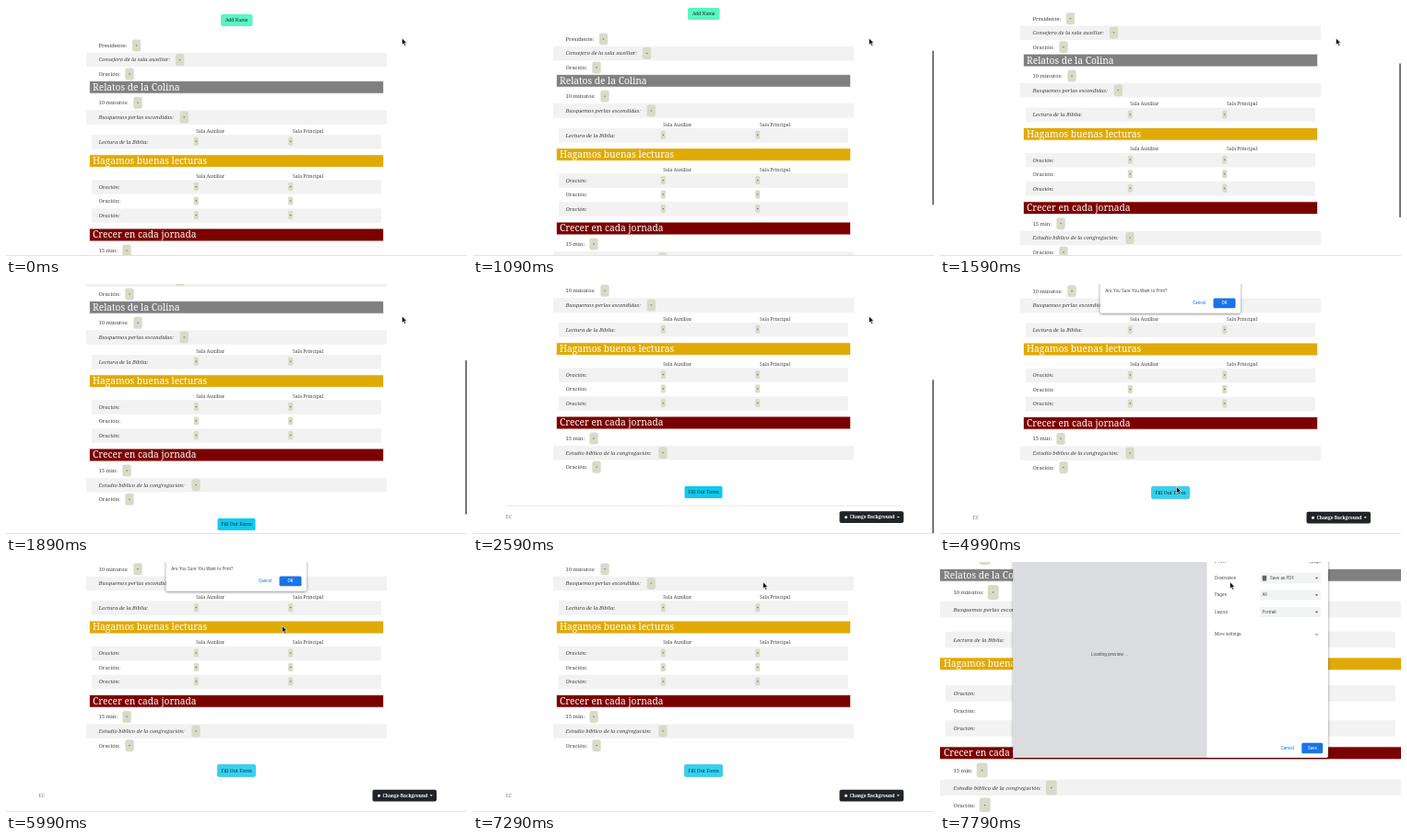
Recreate the animation shown at these times as an HTML page. Size 500 by 272 pixels, loop 7990 ms.

```html
<!DOCTYPE html>
<html lang="es">
<head>
<meta charset="utf-8">
<title>Programa</title>
<style>
html, body { margin: 0; width: 100%; height: 100%; overflow: hidden; background: #fff; }
svg { display: block; width: 100vw; height: 100vh; }
text { font-family: "Noto Serif", serif; fill: #404040; white-space: pre; }
.ui { font-family: Inter, sans-serif; }
.italic { font-style: italic; }
.white { fill: #fff; }
.dark { fill: #1c2a2a; }
.blue { fill: #1a73e8; }
.medium { font-weight: 500; }
.bold { font-weight: 600; }
.middle { text-anchor: middle; }
.end { text-anchor: end; }
.shadow { filter: drop-shadow(0 1px 1.5px #0007); }
</style>
</head>
<body>
<svg id="stage" viewBox="0 0 500 272"></svg>
<script>
const LOOP = 7990;
const stage = document.getElementById('stage');

function add(parent, tag, attrs = {}) {
  const node = document.createElementNS('http://www.w3.org/2000/svg', tag);
  for (const name in attrs) node.setAttribute(name, attrs[name]);
  return parent.appendChild(node);
}
const group = (parent, cls = '') => add(parent, 'g', { class: cls });
const rect = (parent, x, y, width, height, fill, rx = 0) =>
  add(parent, 'rect', { x, y, width, height, fill, rx });
const path = (parent, d, attrs) => add(parent, 'path', { d, ...attrs });

// y is the optical middle of the line
function text(parent, label, x, y, size, cls = '') {
  const node = add(parent, 'text', { x, y: y + size * 0.34, 'font-size': size, class: cls });
  node.textContent = label;
  return node;
}

function picker(parent, x, y, w, h) {
  rect(parent, x - w / 2, y - h / 2, w, h, '#d9dbc9', w / 4);
  path(parent, `M${x - 1} ${y - .6}h2l-1 1.5z`, { fill: '#666' });
}

// a bar with slightly soft edges
function bar(parent, x, y, width, fill) {
  const node = rect(parent, x, y - 6.3, width, 12.6, fill);
  node.setAttribute('stroke', fill);
  node.setAttribute('stroke-opacity', .35);
}

// kind, label, y on screen, y in print layout, picker x or colour
const ROWS = [
  ['plain', 'Presidente:', 43, null, 141.5],
  ['stripe', 'Consejero de la sala auxiliar:', 58.5, null, 188.5],
  ['plain', 'Oración:', 74, -5, 134],
  ['head', 'Relatos de la Colina', 88.4, 14.3, '#808080'],
  ['plain', '10 minutos:', 105.3, 33, 143],
  ['stripe', 'Busquemos perlas escondidas:', 121, 51.8, 193.3],
  ['columns', '', 136, 70],
  ['pair', 'Lectura de la Biblia:', 147.7, 84.5, true],
  ['head', 'Hagamos buenas lecturas', 168.6, 110.8, '#e0aa06'],
  ['columns', '', 185, 128],
  ['pair', 'Oración:', 197, 143, true],
  ['pair', 'Oración:', 212.5, 162, false],
  ['pair', 'Oración:', 228, 181, true],
  ['head', 'Crecer en cada jornada', 249, 207.8, '#7b0000'],
  ['plain', '15 min:', 266, 226.5, 131],
  ['stripe', 'Estudio bíblico de la congregación:', 281.7, 245.5, 206],
  ['plain', 'Oración:', 297.3, 264.5, 134],
];

function drawRows(parent, print) {
  const dx = print ? -86 : 0;
  const rowH = print ? 17.5 : 15.5;
  const size = print ? 5.92 : 5.78;
  const stripe = (y, inset) => {
    const [left, right] = print ? [inset, 500 - inset] : [87 + inset, 413 - inset];
    rect(parent, left, y - rowH / 2, right - left, rowH, '#f2f2f2');
  };
  for (const [kind, label, screenY, printY, extra] of ROWS) {
    const y = print ? printY : screenY;
    if (y === null) continue;
    if (kind === 'head') {
      if (print) bar(parent, -2, y, 504, extra);
      else bar(parent, 91, y, 318, extra);
      text(parent, label, print ? 4 : 94, y, 10.2, 'white medium');
    } else if (kind === 'columns') {
      text(parent, 'Sala Auxiliar', 206.3, y, 5.05);
      text(parent, 'Sala Principal', 311, y, 5.05);
    } else if (kind === 'pair') {
      if (extra) stripe(y, 6);
      text(parent, label, 100.5 + dx, y, size, extra ? 'italic' : '');
      for (const x of [206.3, 308.7]) picker(parent, x, y - .4, 5, 9);
    } else {
      if (kind === 'stripe') stripe(y, 0);
      text(parent, label, 100.5 + dx, y, size, kind === 'stripe' ? 'italic' : '');
      picker(parent, extra + dx + (print ? .7 : 0), y, print ? 12 : 9.4, print ? 16 : 13);
    }
  }
}

// scrolling page
const page = group(stage);
rect(page, 233, 9, 34.5, 13, '#5af5c2', 2);
text(page, 'Add Name', 250.2, 15.5, 4.95, 'middle medium dark');
drawRows(page, false);
const fillButton = rect(page, 229.5, 318, 41, 13, '#0dcaf0', 1.5);
text(page, 'Fill Out Form', 250, 324.6, 5.3, 'middle medium dark');
const footerLine = rect(page, 36, 339.3, 431, .6, '#ddd');
text(page, 'EC', 35.5, 351.7, 5.2).style.fill = '#777';
rect(page, 397.5, 345.3, 69.5, 12.8, '#212529', 2);
add(page, 'circle', { cx: 404.5, cy: 351.8, r: 1.5, fill: '#fff' });
text(page, 'Change Background', 408.5, 351.7, 4.85, 'white bold');
path(page, 'M459.8 350.9h2.8l-1.4 1.6z', { fill: '#fff' });

const scrollbar = rect(stage, 498, 0, 2, 168, '#777', 1);
const bottomEdge = rect(stage, 0, 271, 500, 1, '#e3e3e7');

const printPage = group(stage);
rect(printPage, 0, 0, 500, 272, '#fff');
drawRows(printPage, true);

// confirm box
const confirmBox = group(stage);
rect(group(confirmBox, 'shadow'), 173.5, -20, 152.5, 51.7, '#fff', 2);
text(confirmBox, 'Are You Sure You Want to Print?', 179.3, 7, 4.45, 'ui');
text(confirmBox, 'Cancel', 281.2, 20.9, 4.2, 'ui blue middle medium');
rect(confirmBox, 296.5, 15.5, 24, 10.7, '#1a73e8', 1.5);
text(confirmBox, 'OK', 308.5, 20.9, 4.2, 'ui white middle medium');

// print dialog
const printBox = group(stage);
rect(group(printBox, 'shadow'), 79.5, -20, 341.5, 233, '#fff', 2);
rect(printBox, 79.5, -20, 210, 233, '#dadce0');
text(printBox, 'Loading preview ...', 184, 100.3, 4.5, 'ui middle');
text(printBox, 'Print', 298, -1.2, 5.5, 'ui');
text(printBox, '1 page', 413, -1, 4.4, 'ui end');
const chevron = y => path(printBox, `M407 ${y - .8}l1.6 1.6 1.6-1.6`,
  { fill: 'none', stroke: '#555', 'stroke-width': .8 });
[['Destination', 'Save as PDF', 17.6], ['Pages', 'All', 36], ['Layout', 'Portrait', 54.5]]
  .forEach(([label, value, y], i) => {
    text(printBox, label, 298, y, 4.4, 'ui');
    rect(printBox, 347, y - 5.6, 66, 11.2, '#f1f3f4', 1.5);
    text(printBox, value, i ? 349.5 : 358, y, 4.4, 'ui');
    if (!i) rect(printBox, 349.7, y - 2.8, 4.4, 5.6, '#5f6368', .5);
    path(printBox, `M406.8 ${y - .8}h3.4l-1.7 1.8z`, { fill: '#555' });
  });
text(printBox, 'More settings', 298, 79, 4.4, 'ui');
chevron(79);
text(printBox, 'Cancel', 376.7, 202.6, 4.3, 'ui blue middle medium');
rect(printBox, 392.3, 196.7, 22.9, 11.5, '#1a73e8', 1.5);
text(printBox, 'Save', 404, 202.6, 4.3, 'ui white middle medium');

const cursor = path(stage, 'M0 0V7.2L1.7 5.7 2.9 8.4 4.2 7.8 3 5.2H5.2Z',
  { fill: '#000', stroke: '#fff', 'stroke-width': .6 });

// time followed by values
const SCROLL = [[890, 0], [1090, 7], [1390, 22], [1490, 22], [1590, 29.3], [1890, 63],
  [2190, 87], [2490, 98], [2890, 98], [3090, 97.6]];
const BAR = [[890, 0], [990, 1], [2790, 1], [3090, 0]];
const POINTER = [[2690, 429.5, 35], [2890, 414, 52], [3190, 360, 112], [3590, 286, 196],
  [3890, 256.5, 220.5], [5490, 256.5, 220.5], [5690, 272, 169], [5990, 299.5, 69.5],
  [6190, 308, 29], [6390, 311, 20], [6990, 314.5, 21.8]];

function at(track, t) {
  const i = track.findIndex(step => step[0] > t);
  if (i === 0) return track[0].slice(1);
  if (i < 0) return track[track.length - 1].slice(1);
  const a = track[i - 1], b = track[i];
  const k = (t - a[0]) / (b[0] - a[0]);
  return a.slice(1).map((v, n) => v + (b[n + 1] - v) * k);
}
const show = (node, on) => node.setAttribute('display', on ? 'inline' : 'none');

function render(now) {
  const time = now % LOOP;
  const t = Math.max(0, Math.min(7790, Math.floor((time + 10) / 100) * 100 - 10));
  const [scroll] = at(SCROLL, t);
  const [x, y] = at(POINTER, t);
  const printing = t >= 7390;

  page.setAttribute('transform', `translate(0 ${-scroll})`);
  scrollbar.setAttribute('y', 44.3 + scroll * .61);
  scrollbar.setAttribute('opacity', at(BAR, t)[0]);
  cursor.setAttribute('transform', `translate(${x} ${y})`);
  fillButton.setAttribute('fill', t >= 4090 ? '#31d2f2' : '#0dcaf0');
  fillButton.setAttribute('stroke', t >= 4790 ? '#25b5d2' : 'none');
  fillButton.setAttribute('stroke-width', .6);
  show(footerLine, t < 3090);
  show(bottomEdge, !printing);
  show(confirmBox, t >= 4890 && t < 7290);
  show(printPage, printing);
  show(printBox, printing);
}

let start;
function tick(now) {
  start ??= now;
  render(now - start);
  requestAnimationFrame(tick);
}
render(0);
requestAnimationFrame(tick);
</script>
</body>
</html>
```
